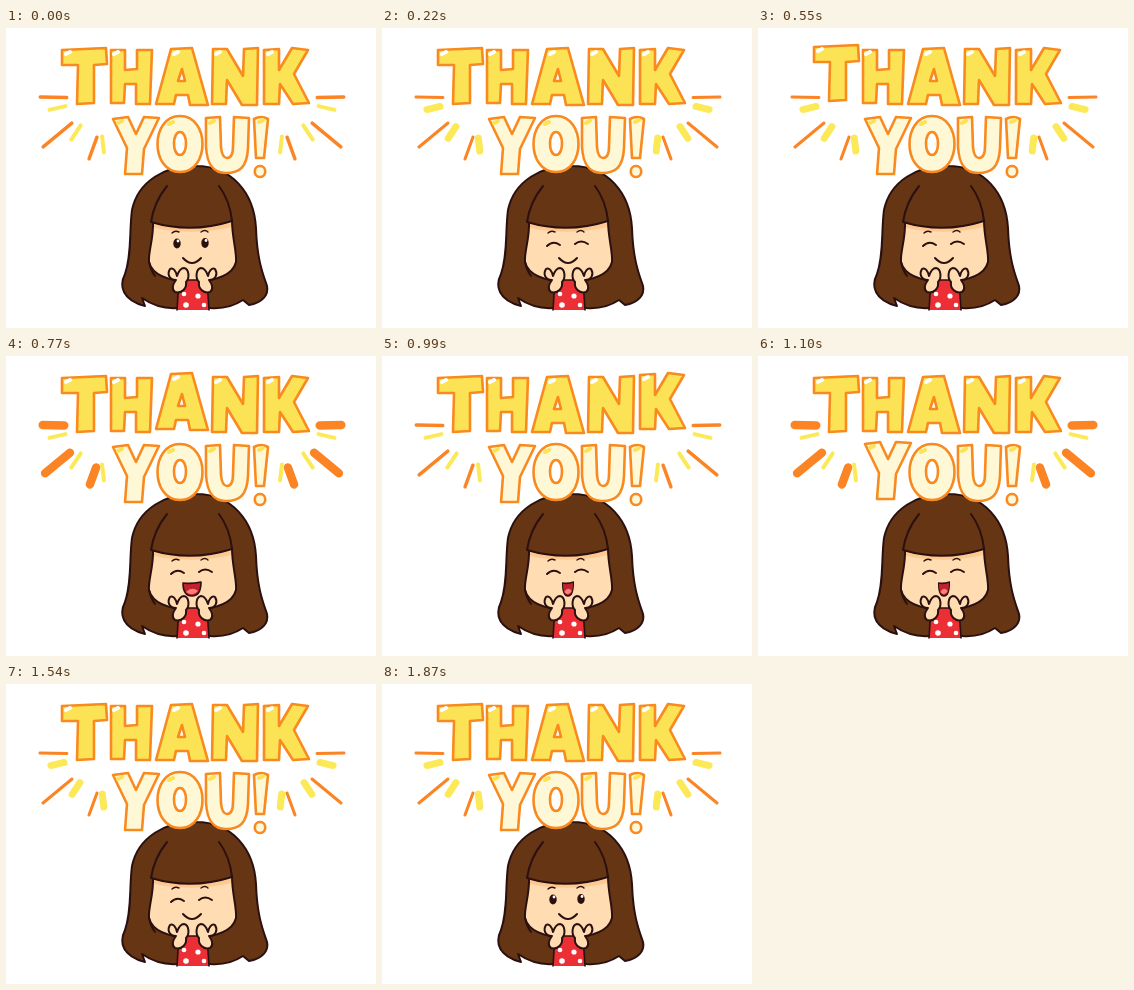
An HTML page for the animation above (1.98 s loop, 370x300 px).

```html
<!DOCTYPE html>
<html lang="en">
<head>
<meta charset="utf-8">
<title>Thank you!</title>
<style>
html, body { margin: 0; width: 100%; height: 100%; overflow: hidden; background: #fff; }
svg { display: block; width: 370px; height: 300px; }
path, line { stroke-linecap: round; stroke-linejoin: round; }
.ink { fill: none; stroke: #2b1010; stroke-width: 2; }
.skin { fill: #ffdcb2; }
</style>
</head>
<body>
<svg viewBox="0 0 370 300" role="img" aria-label="THANK YOU!">
  <g id="rays"></g>

  <g class="ink">
    <path fill="#663514" d="M190 138C160 137 132 153 126 182C123 205 126 226 119 246C113 258 116 272 139 278L136 270C146 277 158 281 172 280H204C216 281 228 278 237 272L243 277C256 275 263 267 261 258C257 246 251 232 250 200C248 165 226 138 190 138Z"/>
    <path class="skin" d="M147 192C148 210 142 224 143 234C146 246 160 253 186 254C212 253 227 246 230 234C231 224 226 210 226 192Z"/>
    <path stroke="none" fill="#ffc890" d="M148 195Q187 205 225 195V199Q187 208 148 200Z"/>
    <path fill="#663514" stroke="none" d="M161 157Q148 174 145 194Q185 206 226 193Q224 173 213 158Z"/>
    <path d="M161 158Q148 174 145 194Q185 206 226 193Q224 173 213 158M143 234Q145 243 149 248"/>
    <path d="M166 205Q169 202 173 204M195 204Q199 201 202 204" stroke-width="1.4"/>
    <path fill="#ec2f35" d="M171 282L173 252H201L203 282" stroke-width="1.6"/>
    <g fill="#fff" stroke="none">
      <circle cx="178" cy="266" r="2.3"/><circle cx="192" cy="268" r="2.6"/>
      <circle cx="180" cy="277" r="2.8"/><circle cx="198" cy="277" r="2.3"/>
    </g>
  </g>

  <g id="open">
    <g fill="#2b1010"><ellipse cx="171" cy="215.5" rx="3.7" ry="5"/><ellipse cx="199" cy="215" rx="3.7" ry="5"/></g>
    <g fill="#fff"><circle cx="172" cy="213" r="1.4"/><circle cx="200" cy="212.500" r="1.4"/></g>
  </g>
  <path class="ink" id="shut" d="M165 218Q171 212 178 217M193 216Q199 211 206 216"/>
  <path class="ink" id="smile" d="M177 230Q186 240 195 230"/>
  <g class="ink" id="laugh">
    <path fill="#c2222b" d="M177 227Q186 228 195 226C195 236 192 240 186 240C180 240 177 236 177 227Z" stroke-width="1.6"/>
    <path fill="#ff7f7b" stroke="none" d="M180 236Q186 230 192 235Q187 241 180 236Z"/>
  </g>

  <g class="ink">
    <path id="hand" class="skin" d="M164 241C161 246 163 252 170 252C167 256 165 261 169 264C176 266 181 260 180 254C184 250 183 241 178 240C174 240 172 245 171 248C170 243 167 239 164 241Z"/>
    <use href="#hand" transform="matrix(-1 0 0 1 373 0)"/>
  </g>

  <g id="words" fill-rule="evenodd" stroke="#f98a1f" stroke-width="2.600"></g>
</svg>
<script>
const $ = id => document.getElementById(id);

const letters = [
  "M56 22L100 20L101 36L88 37L88 75L71 76L72 37L56 37Z",
  "M105 22H119V42L131 41V22H146L144 76H130V56H119L118 75H105Z",
  "M165 21L186 20L202 77H184L182 67H170L168 76H150ZM176 41L179 53H172Z",
  "M207 21H221L237 48L238 21L252 20L251 77H236L221 52L220 76H206Z",
  "M258 22L273 21V42L286 20L302 22L288 46L303 75L287 76L274 56L273 76H258Z",
  "M107 91L122 89L130 106L138 89L153 90L138 121L136 146H119L121 120Z",
  "M174 88C144 88 144 144 174 144C204 144 204 88 174 88ZM174 104C182 104 182 127 174 127C166 127 166 104 174 104Z",
  "M200 90L214 89L215 119Q216 130 221 130Q227 130 227 118L228 89L243 90L242 120C241 139 234 145 220 145C206 145 201 135 200 119Z",
  "M248 91Q255 87 262 91L258 130H250ZM254 138C261 138 261 149 254 149C247 149 247 138 254 138Z"
];
// Left end of each letter's highlight.
const shines = [[60, 26], [108, 26], [168, 26], [210, 26], [262, 26], [112, 95], [163, 96], [204, 95], [253, 94]];

// Left-hand rays, orange and yellow in turn: x1, y1, x2, y2.
const rays = [
  [34, 69, 61, 69.5], [43, 82, 60, 78],
  [37, 119, 66, 95], [65, 112, 75, 97],
  [83, 131, 91, 109], [96, 108, 98, 125]
];
const looks = [
  { orange: 3.4, yellow: 4 },
  { orange: 8.5, yellow: 4 },
  { orange: 3, yellow: 7 }
];

function drawRays(look) {
  const half = rays.map(([x1, y1, x2, y2], i) => {
    const w = i % 2 ? look.yellow : look.orange;
    // Thick rays are shorter, so that their round ends stay in place.
    const k = (w - 3) / 2 / Math.hypot(x2 - x1, y2 - y1);
    const dx = (x2 - x1) * k, dy = (y2 - y1) * k;
    return `<line x1="${x1 + dx}" y1="${y1 + dy}" x2="${x2 - dx}" y2="${y2 - dy}"
      stroke="${i % 2 ? "#fbe958" : "#fb8424"}" stroke-width="${w}"/>`;
  }).join("");
  $("rays").innerHTML = half + `<g transform="matrix(-1 0 0 1 372 0)">${half}</g>`;
}

// The letters hop one after another.
function drawWords(step) {
  $("words").innerHTML = letters.map((d, i) => {
    const hop = step == i + 5 ? -3 : 0, top = i < 5, [x, y] = shines[i];
    return `<g transform="translate(0 ${hop})">
      <path d="${d}" fill="${top ? "#fbe355" : "#fff8d6"}"/>
      <path d="M${x} ${y}l4 -2" stroke="${top ? "#fff" : "#fbe355"}" stroke-width="4"/></g>`;
  }).join("");
}

let last = -1;
function draw(now) {
  const step = Math.floor(Math.max(0, now) / 110) % 18;
  if (step != last) {
    last = step;
    drawRays(looks[step % 3]);
    drawWords(step);
    const awake = step < 2 || step > 15, laughing = step > 5 && step < 12;
    const show = (id, on) => $(id).style.display = on ? "" : "none";
    show("open", awake);
    show("shut", !awake);
    show("smile", !laughing);
    show("laugh", laughing);
    const squeeze = step > 8 ? 0.62 : 1;
    $("laugh").setAttribute("transform", `translate(${186 * (1 - squeeze)}) scale(${squeeze} 1)`);
  }
  requestAnimationFrame(t => draw(t - start));
}
const start = performance.now();
draw(0);
</script>
</body>
</html>
```
